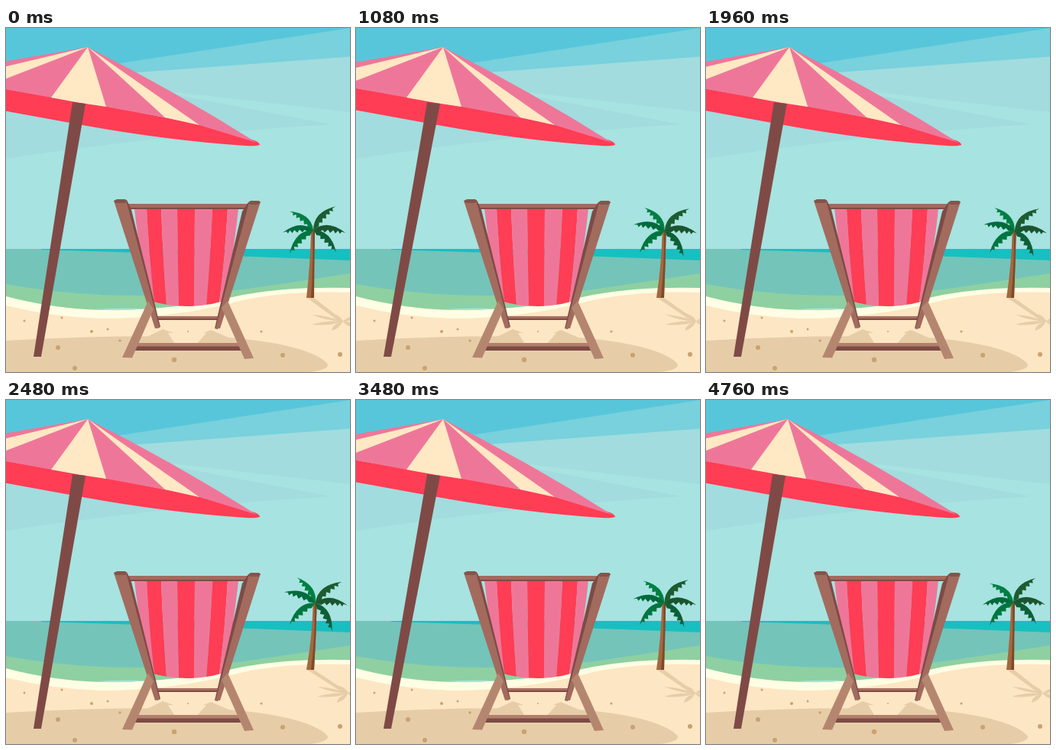
Write an HTML page that moves like this. It is 450 by 450 pixels and loops after 4.8 s.

```html
<!DOCTYPE html>
<html>
<head>
<meta charset="utf-8">
<style>
  html, body { margin: 0; width: 100%; height: 100%; overflow: hidden; }
  svg { display: block; width: 100vw; height: 100vh; }
</style>
</head>
<body>
<svg viewBox="0 0 450 450">
  <!-- sky -->
  <path fill="#a7e3e0" d="M0 0H450V290H0Z"/>
  <path fill="#a2dcde" d="M0 100L225 88L424 126Q200 140 0 171Z"/>
  <path fill="#a2dcde" d="M0 60L450 37V110L215 83L0 60Z"/>
  <path fill="#78d1dc" d="M0 0H450V37.5L160 59L0 68Z"/>
  <path fill="#58c6da" d="M0 0H450L150 46L0 69Z"/>

  <!-- sea and sand -->
  <path fill="#74c4b9" d="M0 289H450V360H0Z"/>
  <path fill="#18bfc0" d="M46 289H450V304Q250 296 46 290Z"/>
  <path fill="#8ed0a1" d="M0 335Q60 346 125 349Q220 353 310 342Q380 332 450 321V390H0Z"/>
  <path fill="#fffee4" d="M0 351Q60 367 125 369Q220 370 310 349Q370 338 450 340V400H0Z"/>
  <path fill="#a7e3e0" d="M116 368Q150 366 182 367Q150 371 116 368Z"/>
  <path fill="#fde6c4" d="M0 363Q60 378 125 380Q220 380 310 356Q370 343 450 346V450H0Z"/>
  <path fill="#e6cda8" d="M0 409Q150 400 290 405C350 409 408 422 421 440Q422 447 398 450H0Z"/>
  <path fill="#e6cda8" d="M172 410L205 394L240 406L268 395L303 410Z"/>
  <path fill="#fde6c4" d="M212 399L222 415H248L262 399Z"/>
  <g id="pebbles" fill="#c9a272"></g>

  <!-- palm -->
  <g fill="#e6cda8">
    <path id="trunkShadow"/>
    <path id="crownShadow" d="M0 0Q-20 -1 -40 -9Q-20 -8 0 0Q-18 6 -40 4Q-22 -2 0 0Q-4 9 -14 12Q-14 4 0 0Q8 8 20 9Q12 -1 0 0Q-12 -6 -17 -11Q-2 -9 0 0Q8 -8 20 -8Q12 0 0 0"/>
  </g>
  <path id="trunk" fill="#a3683f"/>
  <path id="trunkShade" fill="#7d4a2a"/>
  <g id="crown"></g>

  <!-- deck chair -->
  <path fill="#7d4b45" d="M197 377H279V382H197Z"/>
  <path fill="#a66f60" d="M197 377H279V380H197Z"/>
  <g id="fabric"></g>
  <path fill="#7d4b45" d="M155 231H320V237H155Z"/>
  <path fill="#a26b5e" d="M155 230H320V235H155Z"/>
  <path fill="#7d4b45" d="M153 228L158 225L164 238L202 391L198 393Z"/>
  <path fill="#a26b5e" d="M141 226L157 225L201 392L195 393Z"/>
  <path fill="#7d4b45" d="M321 228L317 228L309 240L273 393L277 394Z"/>
  <path fill="#a26b5e" d="M318 228L333 227L280 393L274 393Z"/>
  <path fill="#85544b" d="M141 226L145 224H156L158 226L156 229H143ZM317 228L320 226H331L333 228L330 231H319Z"/>
  <path fill="#7d4b45" d="M165 415H308L310 422H162Z"/>
  <path fill="#b17f6b" d="M167 412H306L308 416.500H165Z"/>
  <path fill="#b5866f" d="M186 357L193 368L165 431.500L152 431ZM290 357L282 366L312 433L324 432Z"/>

  <!-- parasol -->
  <g id="canopy">
    <path fill="#ff3d55" d="M-20 76L0 80L59 90L131 102L253 126L325 147Q332 150 332 153Q326 155 313 154Q210 147 100 127L-20 105Z"/>
    <path fill="#ee7799" d="M107 25L-20 47V77L0 80L59 91L87 96L131 103L208 117L253 127L328 150Q220 82 107 25Z"/>
    <path fill="#ffe8c4" d="M107 25L-20 55V74ZM107 25L59 91Q95 98 131 103ZM107 25L208 117L253 127Z"/>
  </g>
  <path id="pole" fill="#7f4a46"/>
</svg>
<script>
const $ = id => document.getElementById(id);
const add = (parentId, tag, attrs) => {
  const el = document.createElementNS('http://www.w3.org/2000/svg', tag);
  for (const key in attrs) el.setAttribute(key, attrs[key]);
  return $(parentId).appendChild(el);
};

[[68, 418, 3], [90, 445, 3], [220, 434, 3.2], [362, 428, 3], [437, 427, 3], [24, 383, 1.5], [73, 379, 1.5],
 [112, 397, 2], [133, 394, 1.5], [149, 409, 1.7], [334, 397, 1.6], [238, 397, 1]]
  .forEach(([cx, cy, r]) => add('pebbles', 'circle', { cx, cy, r }));

// Fabric stripes run from the top bar down to a sagging hem
const barX = [168, 184, 203, 224, 247, 270, 290, 304];
const hemX = [189, 194, 210, 226, 246, 262, 279, 284];
const hemY = x => 364 - ((x - 237) / 47) ** 2 * 7;
const bend = i => barX[i] + (hemX[i] - barX[i]) * .36;
for (let i = 0; i < 7; i++) {
  const l = hemX[i], r = hemX[i + 1], mid = (l + r) / 2;
  add('fabric', 'path', {
    fill: i % 2 ? '#ff3d55' : '#ee7799',
    d: `M${barX[i]} 236H${barX[i + 1]}Q${bend(i + 1)} 305 ${r} ${hemY(r)}
        Q${mid} ${hemY(mid) + .5} ${l} ${hemY(l)}Q${bend(i)} 305 ${barX[i]} 236Z`
  });
}

// Each leaf: tip offset from the crown at rest, then fully swayed
const leaves = [
  [-31, -24, -23, -34, '#007f43'], [-40, 4, -41, -16, '#006b3c'], [-31, 31, -34, 28, '#00763f'],
  [30, 29, 21, 38, '#0d5f37'], [42, 4, 42, 3, '#1b552f'], [29, -31, 35, -27, '#1d5c31']
].map(([ax, ay, bx, by, fill]) => ({
  ax, ay, bx, by,
  el: add('crown', 'path', {
    fill, d: 'M0 0Q17 -16 42 0L37 -1L35 2L32 -2L29 2L26 -2L22 2L19 -2L15 2L12 -1L8 2Z'
  })
}));

const swing = (t, period) => (1 - Math.cos(2 * Math.PI * t / period)) / 2;
const mix = (a, b, p) => a + (b - a) * p;

function draw(t) {
  const shift = 7.2 * swing(t, 2400);
  $('canopy').setAttribute('transform', `translate(${shift})`);
  const px = shift * .86;
  $('pole').setAttribute('d', `M${87 + px} 97L${104 + px} 99L46 430H36Z`);

  const p = swing(t + 80, 1600);
  const x = 402 + 3 * p, y = 264 + 1.5 * p;
  $('trunk').setAttribute('d', `M${x - 3} ${y}H${x + 2}Q${x + 1} 310 403 353H393Q${x - 4} 310 ${x - 3} ${y}Z`);
  $('trunkShade').setAttribute('d', `M${x - 1} ${y}H${x + 2}Q${x + 1} 310 403 353H399Q${x} 310 ${x - 1} ${y}Z`);
  $('crown').setAttribute('transform', `translate(${x} ${y})`);
  for (const { ax, ay, bx, by, el } of leaves) {
    const dx = mix(ax, bx, p), dy = mix(ay, by, p), s = Math.hypot(dx, dy) / 42;
    const angle = Math.atan2(dy, dx) * 180 / Math.PI;
    el.setAttribute('transform', `rotate(${angle}) scale(${s} ${dx < 0 ? -s : s})`);
  }
  const sx = 440 + 8 * p;
  $('trunkShadow').setAttribute('d', `M394 353H403L${sx + 1} 383L${sx - 3} 385Z`);
  $('crownShadow').setAttribute('transform', `translate(${sx} 384)`);
}

const start = performance.now();
function tick() {
  const t = (performance.now() - start) % 4800;
  draw(Math.floor(t / 40) * 40);
  requestAnimationFrame(tick);
}
tick();
</script>
</body>
</html>
```
